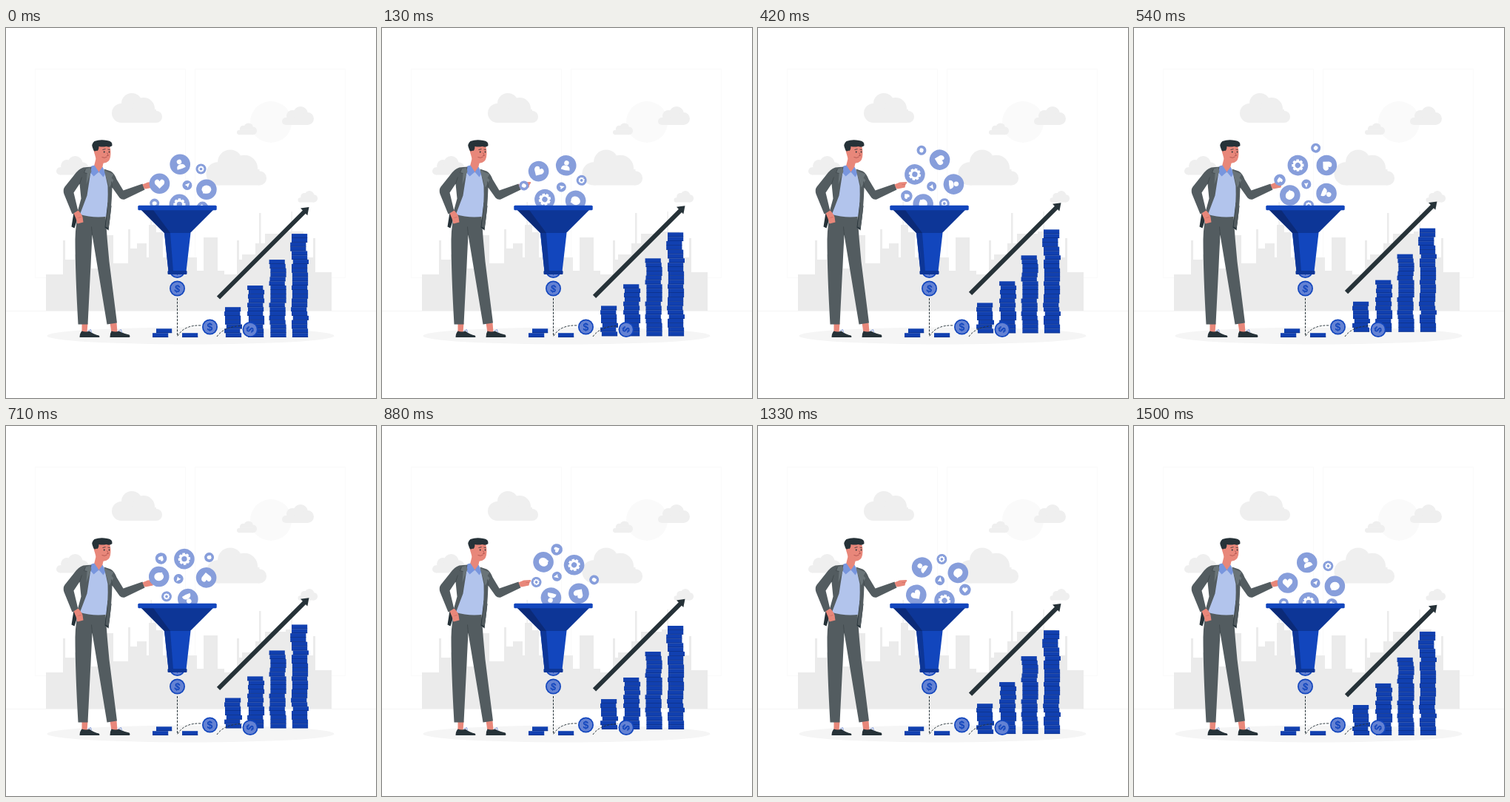
An HTML page with a canvas for the animation above (1.54 s loop, 500x500 px).

```html
<!DOCTYPE html>
<html lang="en">
<head>
<meta charset="utf-8">
<title>Conversion funnel</title>
<style>
  html, body { margin: 0; width: 100%; height: 100%; overflow: hidden; background: #fff; }
  canvas { display: block; width: 500px; height: 500px; }
</style>
</head>
<body>
<canvas id="stage" width="500" height="500"></canvas>
<script>
const ctx = document.getElementById('stage').getContext('2d');
const LOOP = 1540;
const BLUE = '#1246bd', NAVY = '#0d3697', DEEP = '#0b2a78', BUBBLE = '#879edb';
const INK = '#263238', SUIT = '#535c60', SUIT_DARK = '#3d4649', SKIN = '#e8877a';
const GREY = '#ebebeb', CLOUD = '#efefef';

function shape(d, fill) {
  ctx.fillStyle = fill;
  ctx.fill(new Path2D(d));
}
function line(d, stroke, width = 1, dash = []) {
  ctx.strokeStyle = stroke;
  ctx.lineWidth = width;
  ctx.setLineDash(dash);
  ctx.stroke(new Path2D(d));
  ctx.setLineDash([]);
}
function disc(x, y, r, fill) {
  ctx.fillStyle = fill;
  ctx.beginPath();
  ctx.arc(x, y, r, 0, Math.PI * 2);
  ctx.fill();
}
function box(x, y, w, h, fill) {
  ctx.fillStyle = fill;
  ctx.fillRect(x, y, w, h);
}
function roundBox(x, y, w, h, r, fill) {
  ctx.fillStyle = fill;
  ctx.beginPath();
  ctx.roundRect(x, y, w, h, r);
  ctx.fill();
}
function placed(x, y, scale, angle, draw) {
  ctx.save();
  ctx.translate(x, y);
  ctx.rotate(angle);
  ctx.scale(scale, scale);
  draw();
  ctx.restore();
}

// Scenery
function bigCloud(x, y, scale) {
  placed(x, y, scale, 0, () => {
    disc(27, 14, 14, CLOUD);
    disc(43, 21, 15, CLOUD);
    disc(13, 27, 13, CLOUD);
    disc(60, 32, 8, CLOUD);
    box(13, 22, 47, 18, CLOUD);
  });
}
function smallCloud(x, y, scale) {
  placed(x, y, scale, 0, () => {
    disc(5, 20, 5, CLOUD);
    disc(14, 13, 8, CLOUD);
    disc(25, 10, 10, CLOUD);
    disc(34.5, 16.5, 8.5, CLOUD);
    box(5, 15, 30, 10, CLOUD);
  });
}
function scenery() {
  ctx.strokeStyle = '#fafafa';
  ctx.lineWidth = 1;
  ctx.strokeRect(39.5, 55.5, 203, 282);
  ctx.strokeRect(255.5, 55.5, 203, 282);
  disc(358, 127, 28, '#fafafa');
  bigCloud(143, 88, 1);
  bigCloud(270.5, 164.5, 1.2);
  smallCloud(373, 106, 1);
  smallCloud(312, 128.5, .63);
  smallCloud(68, 173, 1.02);
  smallCloud(394.5, 220, .62);
  shape('M54 382V333H77V313H93V306H115V325H126V280H145V318H165V298H177V291H190V310H193V266H203V276H212V310' +
    'H258V328H267V283H286V328H295V333H312V313H319V306H337V291H350V278H378V275H402V310H418V330H440V382Z', GREY);
  for (const [x, y, w] of [[77, 287, 3], [165, 272, 3], [195.5, 235, 1.3], [312, 287, 3],
    [342, 250, 2.5], [385.5, 248, 1.3], [415, 284, 3]]) box(x, y, w, 380 - y, GREY);
  box(0, 382, 500, 1, '#f4f4f4');
  ctx.fillStyle = '#f5f5f5';
  ctx.beginPath();
  ctx.ellipse(249.5, 416, 194, 11.5, 0, 0, Math.PI * 2);
  ctx.fill();
}

function man() {
  // Legs and shoes
  shape('M102 398H110L109 411H102ZM140 398H149L150 411H142Z', SKIN);
  shape('M102 409Q108 411 112 409Q119 414 125 415Q127 417 125 417.5H99Q99 412 102 409Z' +
    'M142 409Q148 411 152 409Q160 413 166 414Q168 417 166 417.5H140Q140 412 142 409Z', INK);
  line('M110 409L114 407L115 411M151 409L155 407L156 411', BUBBLE, 1);
  shape('M98 250L134 253Q136 285 139 315L149.5 398L136 400L116 279L110 400L97 400Q93 330 93 285Q93.5 262 98 250Z', SUIT);
  line('M116 279L115 268', SUIT_DARK, .8);
  // Shirt, neck and collar
  shape('M113 189L132 192L138 207L137 254Q118 257 98 251L106 228Z', '#b2c4ec');
  shape('M122 172L132 178L129 191L125 195L118 188Z', SKIN);
  shape('M115 186L119 185L125 194L118 200L112 193ZM130 187L134 196L131 201L125 194Z', '#7896de');
  // Jacket
  shape('M91 249L88 268L92 270L97 254ZM137 235L133 269L138 273L142 240Z', INK);
  shape('M115 187L104 188Q97 190 91 199L79 214Q76 218 78 224L89 251L97 247L91 222L99 210' +
    'L101 230L95 252L98 255L109 226Z', SUIT);
  shape('M132 190L141 193Q146 196 149 204L158 219L184 210L187 218L160 231Q156 232 153 229L143 215' +
    'Q142 248 138 270L134 268Q138 235 137 213Z', SUIT);
  shape('M113 188L107 190L105 195L109 196L108 211L115 193ZM132 191L137 194L145 197L142 202L145 205L139 215Z', '#6a7478');
  line('M99 210L102 201M143 215L142 207M107 190L105 195L109 196', SUIT_DARK, .8);
  // Hands
  shape('M91 250L97 246Q102 251 103 255L104 262L96 264L94 257Z', SKIN);
  line('M97 256L101 255', '#c66b61', .7);
  shape('M184 211L191 208L200 207.5Q202 209 199 210.5L198 215L188 217L186 216Z', SKIN);
  line('M194 211H199', '#c66b61', .6);
  // Head
  shape('M120 158L139 157Q142 166 140.5 174Q139 181.5 132 182Q125 183 121 176L118 165Z', SKIN);
  shape('M125 159.5Q125 165.5 121 166.5Q118 166.5 117 162.5Q114 156.5 119 152.5Q127 149.5 136 151.5' +
    'Q144 152.5 143 158.5Q140 161.5 135 159.5Q130 160.5 125 159.5Z', INK);
  disc(122, 168, 2.8, SKIN);
  disc(132.2, 167, 1, INK);
  disc(139, 167, .9, INK);
  line('M130 164L134 163M137 163.5L140 164', INK, .8);
  line('M129 174Q133 176 136 173.5M136 168L138 172H135.5', '#a94f4b', .8);
}

// Bubble icons, drawn for a bubble of radius 14
const icons = {
  heart() {
    shape('M0 7L-6 1Q-8 -3 -5 -5Q-2 -7 0 -3Q2 -7 5 -5Q8 -3 6 1Z', '#fff');
  },
  person() {
    placed(0, 0, 1, -.35, () => {
      disc(0, -3.5, 3.3, '#fff');
      shape('M-6 6Q-6 0 0 0Q6 0 6 6Q0 7 -6 6Z', '#fff');
    });
  },
  chat() {
    ctx.fillStyle = '#fff';
    ctx.beginPath();
    ctx.ellipse(0, 0, 6.5, 5.7, 0, 0, Math.PI * 2);
    ctx.fill();
    shape('M-5 1L-5 5.5L0 5Z', '#fff');
  },
  gear() {
    for (let i = 0; i < 8; i++) placed(0, 0, 1, i * Math.PI / 4, () => box(-1.8, -8.2, 3.6, 4, '#fff'));
    disc(0, 0, 6.8, '#fff');
    disc(0, 0, 3.7, BUBBLE);
  },
  plane() {
    shape('M-7 -1L7 -7L2 7L-1 2Z', '#fff');
  },
  tiltedHeart() {
    placed(0, 0, 1, .61, icons.heart);
  }
};
// Offset from the hub, radius, icon
const bubbles = [
  [-4, -25, 13.8, 'person'], [-31.7, 1, 13.8, 'heart'],
  [31.7, 9, 13.8, 'chat'], [-4.8, 29.2, 13.8, 'gear'],
  [24.3, -18.7, 7, 'gear'], [5.7, 3.3, 6.5, 'plane'],
  [-38.5, 27.8, 6.5, 'chat'], [26.3, 33.2, 7.8, 'tiltedHeart']
];
function swirl(angle) {
  placed(239.2, 209.2, 1, angle * Math.PI / 180, () => {
    for (const [x, y, r, icon] of bubbles) {
      disc(x, y, r, BUBBLE);
      placed(x, y, r / 14, 0, icons[icon]);
    }
  });
}

function coin(x, y, angle) {
  disc(x, y, 10.5, BLUE);
  disc(x, y, 8.8, '#6482d3');
  placed(x, y, 1, angle, () => {
    ctx.fillStyle = BLUE;
    ctx.font = 'bold 14px "Liberation Sans", Arial, sans-serif';
    ctx.textAlign = 'center';
    ctx.textBaseline = 'alphabetic';
    ctx.fillText('$', 0, 5);
  });
}
function funnel() {
  coin(231.5, 327.5, 0);
  shape('M183 246H280L249 277H214Z', NAVY);
  shape('M183 246H199L222 277H214Z', DEEP);
  shape('M214 277H249.5L243.5 329H219.5Z', BLUE);
  shape('M214 277H222L226 329H219.5Z', NAVY);
  roundBox(178.3, 239.7, 106.4, 6.5, 1.5, BLUE);
  roundBox(218.5, 328, 26, 5, 1.2, NAVY);
}

const PITCH = 5.83;
function flatCoin(x, y) {
  box(x, y, 21.2, PITCH, '#1140b0');
  box(x, y + PITCH - .8, 21.2, .8, '#0b2f88');
}
// Sideways jog of each coin from the bottom up; 2 is centred
const stacks = [
  [296, '3142212'],
  [327, '221331213231'],
  [356.5, '333212213333123321'],
  [386, '332242122332333224220022']
];
function growth(lift) {
  for (const [x, jogs] of stacks) {
    [...jogs].forEach((jog, i) => flatCoin(x + (jog - 2) * .9, 418 - lift - (i + 1) * PITCH));
  }
  placed(0, -lift, 1, 0, () => {
    line('M287 364.5L404.5 247', INK, 6);
    shape('M398 243.5L409.5 241.9L407.3 253.2Z', INK);
  });
}
function fallenCoins() {
  flatCoin(203, 406.3);
  flatCoin(198, 412.2);
  flatCoin(238, 412.2);
  line('M231.5 365V417M232 416Q241 401 264 402M285 417Q295 403 319 402.5', INK, 1, [3, 1.7]);
  coin(231.5, 352, .2);
  coin(275.5, 404, 0);
  coin(330, 407.5, 1.9);
}

// Turn of the bubbles in degrees per 24 fps step; the growth shares its phase
const turnKeys = [[0, 0], [7, 73], [17, 174], [32, 325], [36, 356.7], [37, 360]];
function turnAt(step) {
  const i = turnKeys.findIndex(([s]) => s > step);
  const [s0, a0] = turnKeys[i - 1], [s1, a1] = turnKeys[i];
  return a0 + (a1 - a0) * (step - s0) / (s1 - s0);
}
function draw() {
  const ticks = Math.floor(performance.now() % LOOP / 10);
  const turn = turnAt(Math.min(36, Math.floor((ticks + .49) * .24)));
  const lift = 10 * (1 - Math.abs(turn / 180 - 1));
  box(0, 0, 500, 500, '#fff');
  scenery();
  placed(.5, .5, 1, 0, man);
  swirl(turn);
  funnel();
  growth(lift);
  fallenCoins();
  requestAnimationFrame(draw);
}
draw();
</script>
</body>
</html>
```
